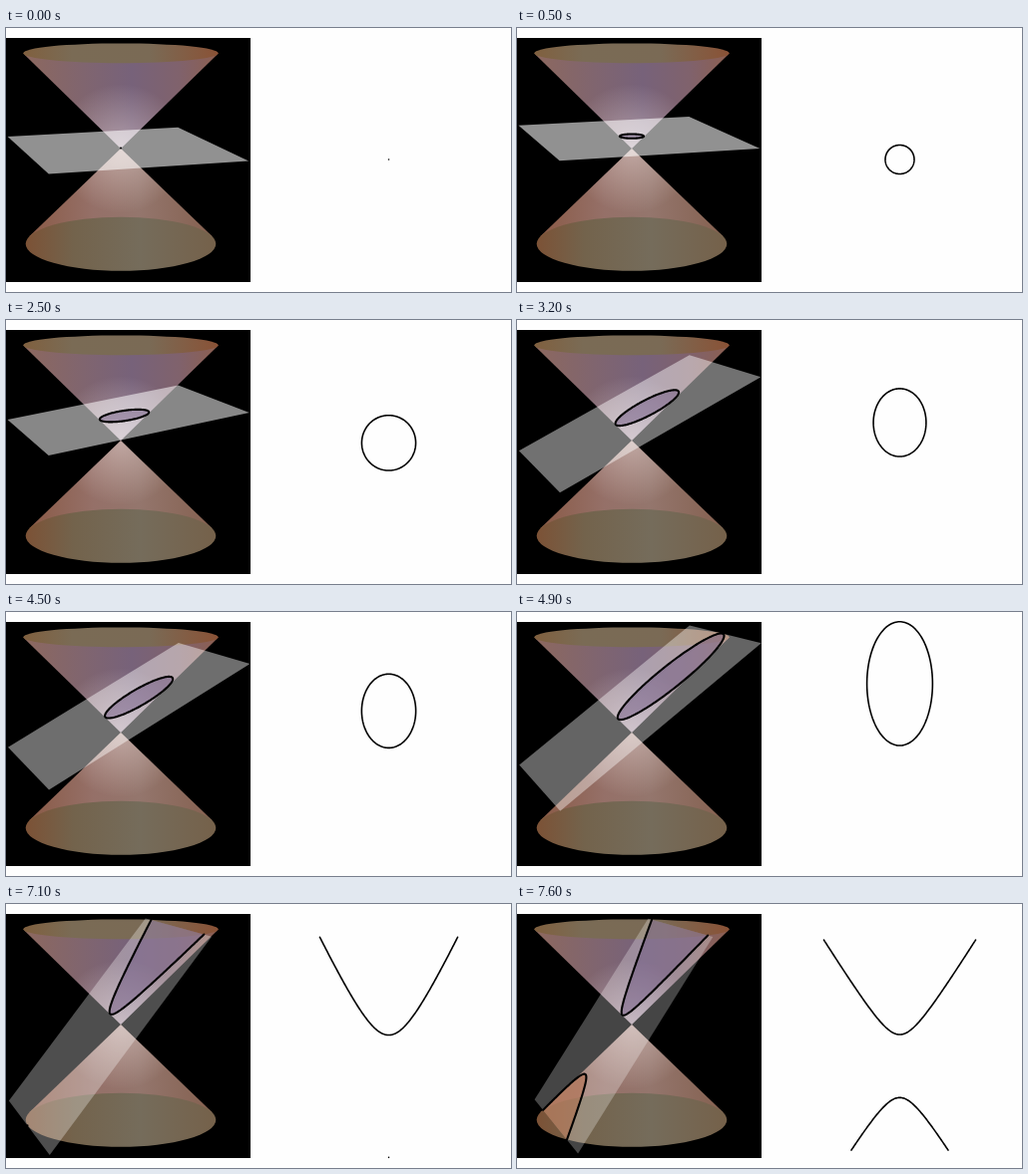
Animation of 506 by 265 pixels, one loop 8000 ms. Source, as an HTML page:

```html
<!DOCTYPE html>
<html lang="en">
<head>
<meta charset="utf-8">
<title>Conic sections</title>
<style>
html, body { margin: 0; width: 100%; height: 100%; overflow: hidden; background: #fefefe; }
svg { display: block; width: 506px; height: 265px; }
.curve { fill: none; stroke: #000; stroke-linecap: round; stroke-linejoin: round; }
</style>
</head>
<body>
<svg viewBox="0 0 506 265">
  <defs>
    <linearGradient id="upper" gradientUnits="userSpaceOnUse" x1="20" x2="212">
      <stop offset="0" stop-color="#8c685f"/><stop offset=".3" stop-color="#80656f"/>
      <stop offset=".55" stop-color="#77627a"/><stop offset=".8" stop-color="#80626c"/>
      <stop offset="1" stop-color="#8c5f50"/>
    </linearGradient>
    <linearGradient id="lower" gradientUnits="userSpaceOnUse" x1="22" x2="208">
      <stop offset="0" stop-color="#8a5a46"/><stop offset=".35" stop-color="#957068"/>
      <stop offset=".6" stop-color="#94766d"/><stop offset="1" stop-color="#84604f"/>
    </linearGradient>
    <linearGradient id="mouth">
      <stop offset="0" stop-color="#80603f"/><stop offset=".25" stop-color="#7a6b55"/>
      <stop offset=".65" stop-color="#7a6a55"/><stop offset="1" stop-color="#8a5236"/>
    </linearGradient>
    <linearGradient id="base">
      <stop offset="0" stop-color="#7c5236"/><stop offset=".25" stop-color="#73634c"/>
      <stop offset=".6" stop-color="#756c5b"/><stop offset="1" stop-color="#75614a"/>
    </linearGradient>
    <radialGradient id="glow" gradientUnits="userSpaceOnUse" cx="115" cy="121" r="65">
      <stop offset="0" stop-color="#fff0f0" stop-opacity=".42"/>
      <stop offset="1" stop-color="#fff0f0" stop-opacity="0"/>
    </radialGradient>
  </defs>
  <rect y="10" width="245" height="245"/>
  <path d="M115 121L18 26.3H212Z" fill="url(#upper)"/>
  <path d="M115 121L23.5 209H206.5Z" fill="url(#lower)"/>
  <path d="M115 121L18 26.3H212ZL23.5 209H206.5Z" fill="url(#glow)"/>
  <ellipse cx="115" cy="25.3" rx="97.6" ry="9.9" fill="url(#mouth)"/>
  <ellipse cx="115" cy="216.7" rx="95.3" ry="27" fill="url(#base)"/>
  <path id="plane" fill="#fff"/>
  <path id="innerTop" fill="#68507c" fill-opacity=".45"/>
  <path id="innerLow" fill="#b4643c" fill-opacity=".45"/>
  <path id="section" class="curve" stroke-width="2.1"/>
  <path id="flat" class="curve" stroke-width="1.6"/>
</svg>
<script>
const LOOP = 8000, STARTS = [100, 2300, 4500, 6700];
// slope, pixels per unit and origin height of the flat view
const VIEW = [[0, 116, 132], [.25, 101, 124.5], [.5, 91.5, 120], [.75, 87, 118.5],
              [1, 85.2, 117], [1.25, 86.3, 116.2], [1.5, 87.8, 115.2]];
const set = (id, d) => document.getElementById(id).setAttribute('d', d);
const path = pts => pts.length ? 'M' + pts.map(p => p.map(n => n.toFixed(2)).join(' ')).join('L') : '';

function project([u, v, z]) {
  const w = 1 + .027 * u - .0882 * v - .012 * z;
  return [115 + (92.1 * u + 28.2 * v) / w, -80 + (200.5 - 97.3 * z) / w];
}

function flatView(s) {
  const i = Math.min(VIEW.length - 2, Math.floor(s * 4));
  const [a, b] = [VIEW[i], VIEW[i + 1]], f = (s - a[0]) * 4;
  const scale = a[1] + (b[1] - a[1]) * f, top = a[2] + (b[2] - a[2]) * f;
  const stretch = Math.hypot(1, s);
  return ([u, v]) => [383.5 + scale * v, top - scale * stretch * u];
}

// one branch of u² + v² = z² on the plane z = h + s·u, from vertex to far end
function branch(h, s, vertex, end) {
  const pts = [], N = 80;
  for (let i = -N; i <= N; i++) {
    const u = vertex + (end - vertex) * (1 - Math.cos(Math.PI * i / N)) / 2;
    const z = h + s * u;
    pts.push([u, Math.sign(i) * Math.sqrt(Math.max(0, z * z - u * u)), z]);
  }
  return pts;
}

function draw(t) {
  const p = STARTS.map(a => Math.max(0, Math.min(10, Math.floor((t - a) / 100) + 1)) / 10);
  const h = .25 * p[0], s = .5 * (p[1] + p[2] + p[3]);
  const low = s ? Math.max(-1, -(1 + h) / s) : -1;
  const high = s ? Math.min(1, (1 - h) / s) : 1;

  const quad = [[low, -1], [high, -1], [high, 1], [low, 1]].map(([u, v]) => project([u, v, h + s * u]));
  set('plane', path(quad) + 'Z');
  document.getElementById('plane').setAttribute('fill-opacity', .57 * Math.exp(-.5 * s));

  const far = s < 1 ? Math.min(h / (1 - s), s ? (1 - h) / s : 1) : high;
  const upper = branch(h, s, -h / (1 + s), far);
  const tip = s > 1 ? -h / (s - 1) : -9;
  const lower = tip >= low - 1e-9 ? branch(h, s, tip, low) : [];

  const top3 = path(upper.map(project)), low3 = path(lower.map(project)), flat = flatView(s);
  set('innerTop', top3);
  set('innerLow', low3);
  set('section', top3 + low3);
  set('flat', path(upper.map(flat)) + path(lower.map(flat)));
}

function tick() {
  draw(performance.now() % LOOP);
  requestAnimationFrame(tick);
}
tick();
</script>
</body>
</html>
```
